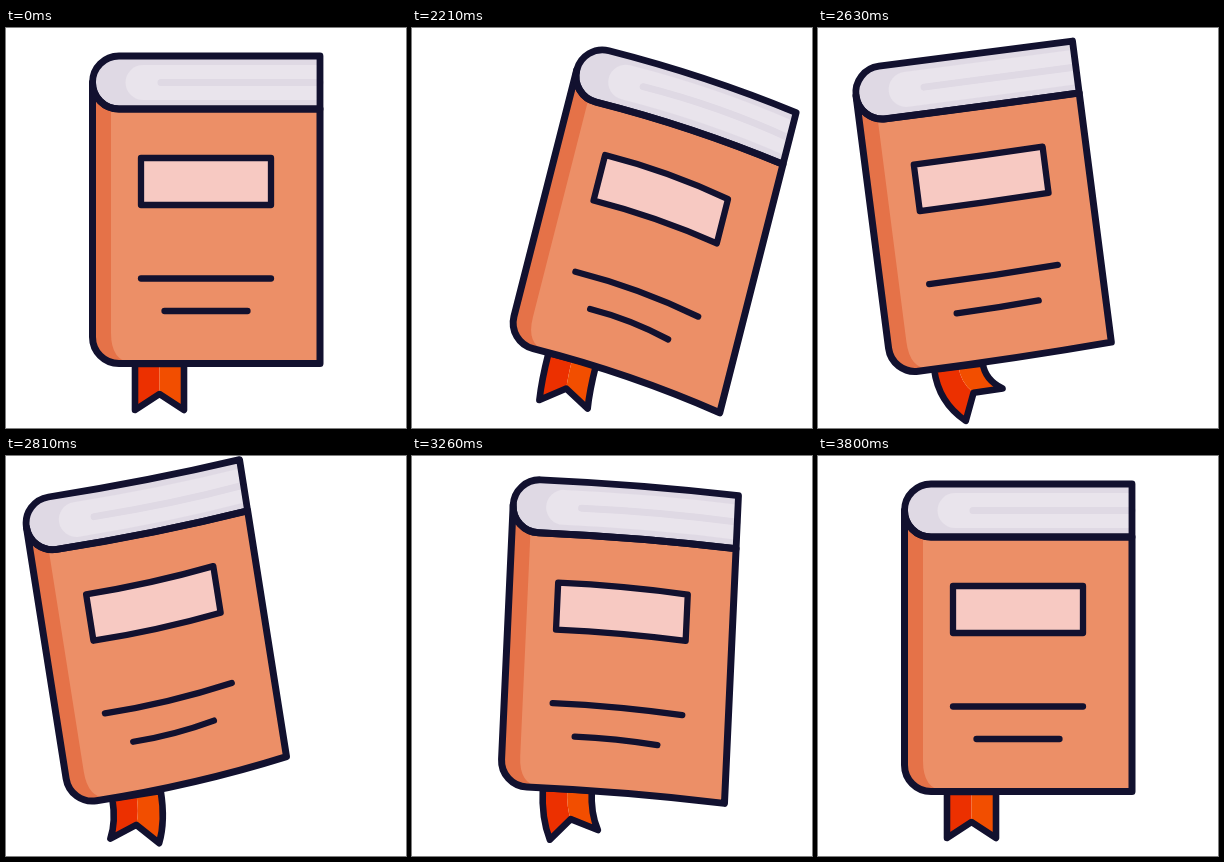
These frames come from a looping animation (400 by 400 pixels, 3.83 s). An HTML page with a canvas:

```html
<!DOCTYPE html>
<html>
<head>
<meta charset="utf-8">
<style>
html, body { margin: 0; width: 100%; height: 100%; overflow: hidden; background: #fff; }
canvas { display: block; }
</style>
</head>
<body>
<canvas width="400" height="400"></canvas>
<script>
const ctx = document.querySelector('canvas').getContext('2d');
const LOOP = 3830, HOLD = 2030, STEP = 30;
const INK = '#12112f';

// turning points of the sway: the book leads, its free side and the ribbon follow
const LEAD = [1990, 2240, 2735, 3150, 3620];
const LAG = [1990, 2240, 2890, 3280, 3620];
const TAIL = [2000, 2210, 2610, 2980, 3270, 3620];

// cosine ease between turning points, starting and ending at rest
function sway(t, times, ...peaks) {
  const values = [0, ...peaks, 0];
  const i = times.findIndex(end => t < end);
  if (i < 1) return 0;
  const s = (t - times[i - 1]) / (times[i] - times[i - 1]);
  return values[i - 1] + (values[i] - values[i - 1]) * (1 - Math.cos(Math.PI * s)) / 2;
}

function draw(d, fill, stroke, width = 6.3) {
  const path = new Path2D(d);
  if (fill) {
    ctx.fillStyle = fill;
    ctx.fill(path);
  }
  if (stroke) {
    ctx.strokeStyle = stroke;
    ctx.lineWidth = width;
    ctx.stroke(path);
  }
}

function ribbon(angle) {
  const cos = Math.cos(angle), sin = Math.sin(angle);
  const mx = 153.5 - 46 * Math.sin(0.78 * angle), my = 336 + 46 * Math.cos(0.78 * angle);
  const side = (x, tx, ty) => {
    const ctrl = `Q${x} ${336 + (ty - 336) * 0.6} `;
    return { down: `M${x} 336${ctrl}${tx} ${ty}`, up: `L${tx} ${ty}${ctrl}${x} 336` };
  };
  const left = side(129, mx - 24.5 * cos, my - 24.5 * sin);
  const mid = side(153.5, mx + 16 * sin, my - 16 * cos);
  const right = side(178, mx + 24.5 * cos, my + 24.5 * sin);
  draw(left.down + mid.up + 'Z', '#ec3000');
  draw(mid.down + right.up + 'Z', '#f24e00');
  draw(`${left.down}L${mx + 16 * sin} ${my - 16 * cos}${right.up}Z`, null, INK, 6.6);
}

function book(bend, spread, shift) {
  // horizontal edge from a fixed left end to a bent right end
  const edge = (x1, x2, y, k = 1) => {
    const x = x2 > 300 ? x2 + shift : x2;
    const end = `${x} ${y + k * (bend + spread * (y - 181) / 307)}`;
    const ctrl = `Q${(x1 + x2) / 2} ${y} `;
    return { end, out: ctrl + end, back: `L${end}${ctrl}${x1} ${y}` };
  };
  const line = (x1, x2, y, k) => `M${x1} ${y}${edge(x1, x2, y, k).out}`;
  const fold = edge(113, 314, 81);
  const cap = 'A26.5 26.5 0 0 ';
  const closing = `${fold.back}${cap}1 `;

  const cover = `M86.5 54.5V309${cap}0 113 335.5${edge(113, 314, 335.5).out}L${fold.end}${closing}86.5 54.5Z`;
  draw(cover, '#e57248');
  draw(`M105 78V305Q105 333 126 335${edge(126, 314, 335).out}L${fold.end}${fold.back}Z`, '#ec8f67');

  const pages = `${line(113, 314, 28)}${closing}113 28Z`;
  draw(pages, '#dfd9e4');
  draw(`${line(137, 314, 37)}${edge(137, 314, 72).back}A17.5 17.5 0 0 1 137 37Z`, '#e9e4ec');
  draw(line(155, 314, 54.5), null, '#dfd9e4', 7);

  draw(cover, null, INK, 7);
  draw(pages, null, INK, 6.8);
  draw(`${line(135, 265, 130, 0.85)}${edge(135, 265, 177, 0.75).back}Z`, '#f7c9c2', INK);
  draw(line(135, 265, 250.5, 0.85), null, INK);
  draw(line(158.5, 241.5, 283, 0.65), null, INK);
}

let start;
function frame(now) {
  start ??= now;
  const clock = (now - start) % LOOP;
  const t = clock < HOLD ? 0 : HOLD + Math.floor((clock - HOLD) / STEP) * STEP;

  const tilt = sway(t, LEAD, 14.8, -10, 3);
  const dy = sway(t, LEAD, -11, 7.5, -4.3);
  const dx = sway(t, LAG, 8, -24, 2);
  const bend = sway(t, LAG, 15.5, -11.5, 7.2);
  const shift = sway(t, LAG, -4.5, -6.5, -2.8);
  const swing = sway(t, TAIL, 10, -42, 42, -11.5);

  ctx.setTransform(1, 0, 0, 1, 0, 0);
  ctx.clearRect(0, 0, 400, 400);
  ctx.lineJoin = ctx.lineCap = 'round';
  ctx.translate(130 + dx, 335 + dy);
  ctx.rotate(tilt * Math.PI / 180);
  ctx.translate(-130, -335);
  ribbon((swing - tilt) * Math.PI / 180);
  book(bend, dx * 0.3, shift);
  requestAnimationFrame(frame);
}
requestAnimationFrame(frame);
</script>
</body>
</html>
```
